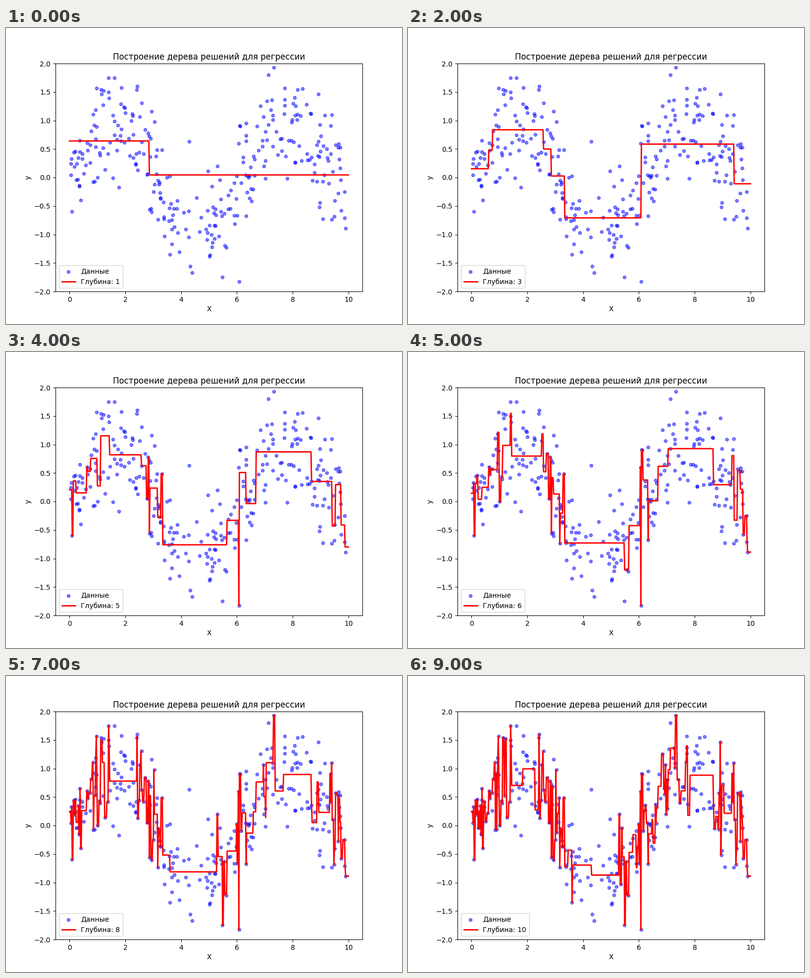
A matplotlib script that plays this animation: 800x600 px, repeating every 10 s.

```python
import matplotlib.pyplot as plt
import numpy as np
from matplotlib.animation import FuncAnimation

MAX_DEPTH = 10

# Noisy sine samples
np.random.seed(42)
x = np.random.rand(300) * 10
y = np.sin(x) + np.random.randn(300) * 0.5

order = np.argsort(x)
xs, ys = x[order], y[order]
grid = np.linspace(0, 10, 500)


def best_split(y):
    """Size of the left part that lowers the squared error the most."""
    left = np.cumsum(y)[:-1]
    right = y.sum() - left
    n = np.arange(1, len(y))
    return int(np.argmax(left**2 / n + right**2 / (len(y) - n))) + 1


def predict(x, y, depth, points):
    """Regression tree of a given depth, x and points being sorted."""
    if depth == 0 or len(y) < 2:
        return np.full(len(points), y.mean())
    k = best_split(y)
    cut = np.searchsorted(points, (x[k - 1] + x[k]) / 2, side="right")
    return np.concatenate([
        predict(x[:k], y[:k], depth - 1, points[:cut]),
        predict(x[k:], y[k:], depth - 1, points[cut:]),
    ])


curves = [predict(xs, ys, d, grid) for d in range(1, MAX_DEPTH + 1)]

fig, ax = plt.subplots(figsize=(8, 6), dpi=100)


def draw(frame):
    ax.clear()
    ax.scatter(x, y, s=20, color="blue", alpha=0.5, label="Данные")
    ax.plot(grid, curves[frame], color="red", lw=2,
            label=f"Глубина: {frame + 1}")
    ax.set_xlim(-0.5, 10.5)
    ax.set_ylim(-2, 2)
    ax.set_title("Построение дерева решений для регрессии")
    ax.set_xlabel("X")
    ax.set_ylabel("y")
    ax.legend(loc="lower left")
    return ax.get_children()


anim = FuncAnimation(fig, draw, frames=MAX_DEPTH, interval=1000,
                     repeat=True, repeat_delay=0)
plt.show()
```
